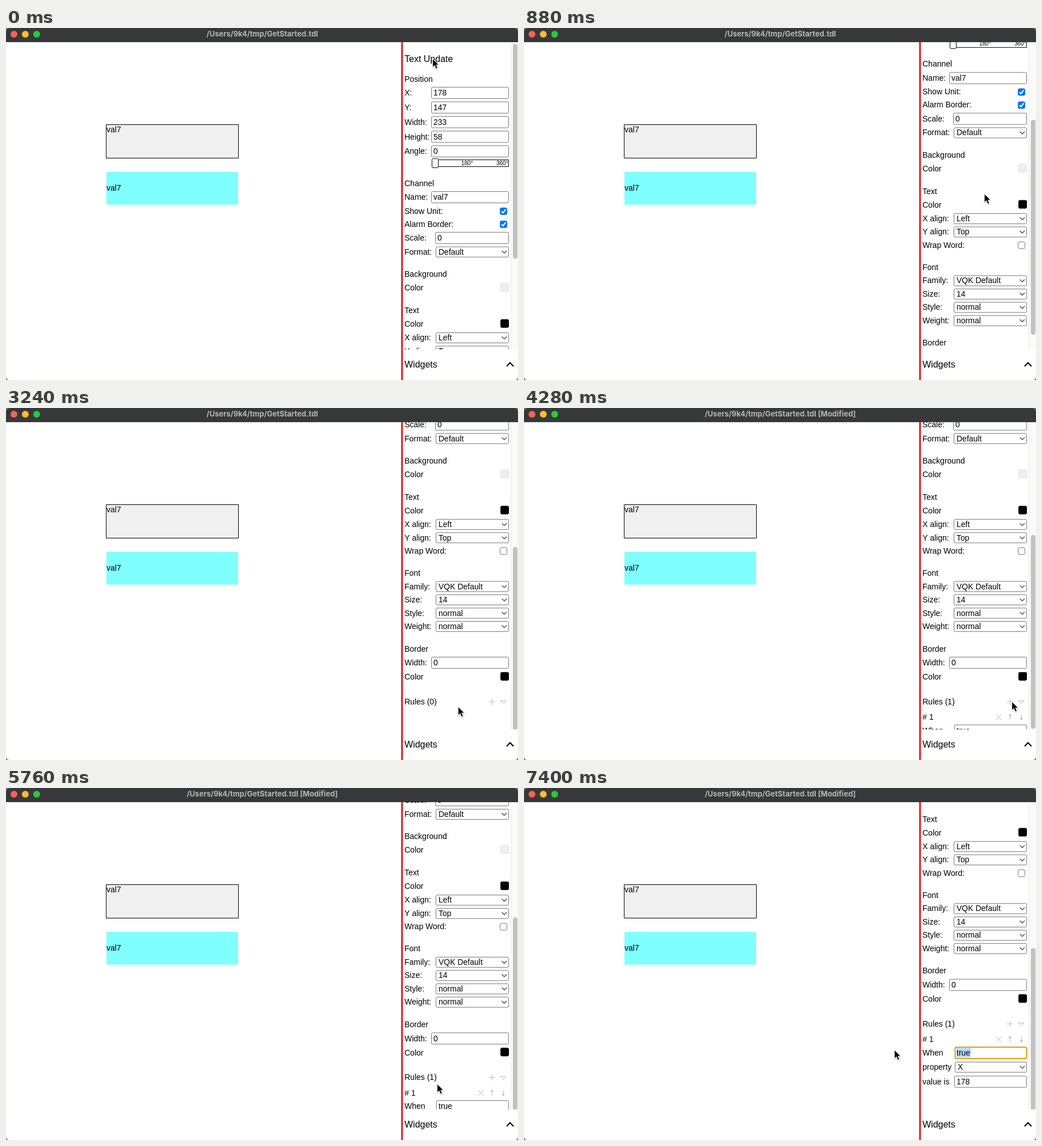
An HTML page with a canvas for the animation above (8 s loop, 902 px wide and 621 px high).

```html
<!DOCTYPE html>
<html lang="en">
<head>
<meta charset="utf-8">
<title>Rule editor</title>
<style>
html, body { margin: 0; width: 100%; height: 100%; overflow: hidden; background: #fff; }
canvas { display: block; }
</style>
</head>
<body>
<canvas id="stage" width="902" height="621"></canvas>
<script>
const ctx = document.getElementById('stage').getContext('2d');
const LOOP = 8000, TICK = 148;
const VIEW_TOP = 25, VIEW_BOTTOM = 567, VIEW_HEIGHT = 595;
const LEFT = 702, RIGHT = 886;
const CLICK_ADD = 29, CLICK_WHEN = 46;
const BORDER = '#767676', ICON = '#b8b8b8';

// Pointer stops: tick, x, y.
const stops = [[0, 752, 55], [4, 797, 211], [8, 826, 376], [10, 837, 521], [16, 705, 520],
  [18, 750, 521], [20, 701, 522], [21, 701, 522], [22, 797, 528], [27, 860, 519], [29, 860, 519],
  [34, 752, 525], [39, 760, 523], [45, 812, 468], [46, 812, 468], [50, 653, 463]];

const rowHeight = { label: 23.5, select: 23.5, input: 25.8, scale: 25.8, check: 23, color: 24.5, slider: 15.6 };
const SECTION_GAP = 16;
const rows = [
  ['label', 'Position'],
  ['input', 'X:', '178'],
  ['input', 'Y:', '147'],
  ['input', 'Width:', '233'],
  ['input', 'Height:', '58'],
  ['input', 'Angle:', '0'],
  ['slider', ''],
  ['label', 'Channel'],
  ['input', 'Name:', 'val7'],
  ['check', 'Show Unit:', true],
  ['check', 'Alarm Border:', true],
  ['scale', 'Scale:', '0'],
  ['select', 'Format:', 'Default'],
  ['label', 'Background'],
  ['color', 'Color', '#efefef', '#dedede'],
  ['label', 'Text'],
  ['color', 'Color', '#000', '#000'],
  ['select', 'X align:', 'Left'],
  ['select', 'Y align:', 'Top'],
  ['check', 'Wrap Word:', false],
  ['label', 'Font'],
  ['select', 'Family:', 'VQK Default'],
  ['select', 'Size:', '14'],
  ['select', 'Style:', 'normal'],
  ['select', 'Weight:', 'normal'],
  ['label', 'Border'],
  ['input', 'Width:', '0'],
  ['color', 'Color', '#000', '#000'],
];

const pointer = { x: 0, y: 0, overInput: false };

function ease(from, to, k) {
  const u = Math.min(1, Math.max(0, (k - from) / (to - from)));
  return u * u * (3 - 2 * u);
}

const scrollAt = k => 341.2 * ease(3.26, 8, k) + 102.1 * ease(38.2, 43, k);

function movePointer(k) {
  const next = stops.findIndex(stop => stop[0] > k);
  const [k1, x1, y1] = stops.at(next < 0 ? -1 : next);
  const [k0, x0, y0] = next < 0 ? stops[0] : stops[next - 1];
  const f = next < 0 ? 1 : (k - k0) / (k1 - k0);
  pointer.x = x0 + (x1 - x0) * f;
  pointer.y = y0 + (y1 - y0) * f;
  pointer.overInput = false;
}

function text(str, x, y, size = 14) {
  ctx.font = `${size}px "Liberation Sans", Arial, sans-serif`;
  ctx.fillStyle = '#000';
  ctx.fillText(str, x, y + size * .35);
}

function rect(x, y, w, h, color) {
  ctx.fillStyle = color;
  ctx.fillRect(x, y, w, h);
}

function box(x, y, w, h, r, fill, stroke, line = 1) {
  ctx.beginPath();
  ctx.roundRect(x, y, w, h, r);
  ctx.fillStyle = fill;
  ctx.fill();
  if (!stroke) return;
  ctx.strokeStyle = stroke;
  ctx.lineWidth = line;
  ctx.stroke();
}

// Each path is drawn around the point (x, y).
function lines(x, y, color, width, ...paths) {
  ctx.beginPath();
  for (const p of paths) {
    for (let i = 0; i < p.length; i += 2) ctx[i ? 'lineTo' : 'moveTo'](x + p[i], y + p[i + 1]);
  }
  ctx.strokeStyle = color;
  ctx.lineWidth = width;
  ctx.stroke();
}

function triangle(x, y, w, h, color) {
  ctx.beginPath();
  ctx.moveTo(x - w / 2, y);
  ctx.lineTo(x + w / 2, y);
  ctx.lineTo(x, y + h);
  ctx.closePath();
  ctx.fillStyle = color;
  ctx.fill();
}

// Hovering lags one tick behind the scroll, as the page repaints late.
function input(x, y, value, lag = 0, focused = false) {
  const over = pointer.x > x && pointer.x < RIGHT && Math.abs(pointer.y - y - lag) < 10.5;
  if (focused) {
    box(x + 1.5, y - 9.5, RIGHT - x - 2, 20, 2.5, '#fff', '#e59700', 2);
    rect(x + 4, y - 8, 25, 16, '#b3d7ff');
  } else {
    box(x + .5, y - 9.8, RIGHT - x - 1, 20, 2, '#fff', BORDER);
  }
  text(value, x + 4, y);
  if (!over) return;
  pointer.overInput = true;
  if (isNaN(value)) return;
  rect(868, y - 9, 13, 19, '#efefef');
  triangle(874.5, y - 2, 7, -4, '#555');
  triangle(874.5, y + 3, 7, 4, '#555');
}

function select(x, y, value) {
  box(x + .5, y - 8.7, RIGHT - x - 1, 18, 2, '#fff', BORDER);
  text(value, x + 5, y);
  lines(877.8, y, '#333', 1.2, [-4.2, -1.8, 0, 2.4, 4.2, -1.8]);
}

const drawControl = {
  label() {},
  input(y, lag, value) { input(749, y, value, lag); },
  scale(y, lag, value) { input(756, y, value, lag); },
  select(y, lag, value) { select(757, y, value); },
  check(y, lag, on) {
    const color = on ? '#0075ff' : '#fff';
    box(870.5, y - 5.5, 12, 12, 2.5, color, on ? color : BORDER);
    if (on) lines(876.5, y, '#fff', 2, [-3.5, .5, -.8, 3.4, 3.8, -3]);
  },
  color(y, lag, fill, stroke) { box(871.5, y - 8, 14, 14, 2, fill, stroke); },
  slider(y) {
    box(755.5, y - 5.6, 130, 12, 0, '#fff', '#000');
    box(750.5, y - 7.6, 11, 16, 2, '#fff', '#000');
    text('180°', 802, y, 10);
    text('360°', 864, y, 10);
  },
};

function drawRows(top, scroll, lag) {
  text('Text Update', LEFT, top - 35.5, 16);
  let edge = top - rowHeight.label / 2 - SECTION_GAP;
  for (const [kind, label, ...values] of rows) {
    if (kind === 'label') edge += SECTION_GAP;
    const y = edge + rowHeight[kind] / 2;
    text(label, LEFT, y);
    drawControl[kind](y, lag, ...values);
    edge += rowHeight[kind];
  }
  return edge + SECTION_GAP + rowHeight.input / 2 + 2.5;
}

function drawRules(y, lag, added, focused) {
  text(`Rules (${added ? 1 : 0})`, LEFT, y);
  lines(856.3, y, ICON, 1, [-5.5, .2, 5.5, .2], [0, -5.3, 0, 5.7]);
  lines(876, y, ICON, 1, [-5, -1.5, 5, -1.5, 0, 3.5, -5, -1.5]);
  if (!added) return;

  const head = y + 27.3, when = y + 50.8;
  text('# 1', LEFT, head);
  lines(836.5, head + .2, ICON, 1, [-4.7, -4.7, 4.7, 4.7], [4.7, -4.7, -4.7, 4.7]);
  for (const [x, dir] of [[856.3, -1], [876.3, 1]]) {
    lines(x, head, ICON, 1, [0, -5, 0, 5]);
    triangle(x, head + 2 * dir, 5, 4 * dir, ICON);
  }
  text('When', LEFT, when);
  input(758, when, 'true', lag, focused);
  text('property', LEFT, when + 25.4);
  select(759, when + 25.4, 'X');
  text('value is', LEFT, when + 51.2);
  input(758, when + 51.2, '178', lag);
}

function drawArrow(x, y) {
  const outline = [0, 0, 0, 13.2, 3.2, 10.4, 5.8, 16.2, 7.9, 15.2, 5.3, 9.7, 9.6, 9.6, 0, 0];
  ctx.save();
  ctx.shadowColor = 'rgba(0,0,0,.35)';
  ctx.shadowBlur = 2;
  ctx.shadowOffsetY = 1;
  lines(x, y, '#fff', 2, outline);
  ctx.shadowColor = 'transparent';
  ctx.fillStyle = '#000';
  ctx.fill();
  ctx.restore();
}

function drawBeam(x, y) {
  const shape = [[0, -6, 0, 6], [-3, -7.5, 0, -6, 3, -7.5], [-3, 7.5, 0, 6, 3, 7.5], [-2, 2.5, 2, 2.5]];
  lines(x, y, '#fff', 2.6, ...shape);
  lines(x, y, '#000', 1.1, ...shape);
}

function drawWindow(modified) {
  rect(0, 0, 902, 621, '#777');
  box(0, 0, 902, 621, 6, '#fff');
  box(0, 0, 902, 25, [6, 6, 0, 0], '#373839');
  ['#fe5f57', '#febc2e', '#28c840'].forEach((color, i) => box(8 + i * 20, 5, 12, 12, 6, color));
  ctx.font = '700 13px Inter, sans-serif';
  ctx.fillStyle = '#b7b7b7';
  ctx.textAlign = 'center';
  ctx.fillText('/Users/9k4/tmp/GetStarted.tdl' + (modified ? ' [Modified]' : ''), 451.5, 15);
  ctx.textAlign = 'left';

  box(176.5, 170.5, 233, 59, 0, '#f0f0f0', '#000');
  text('val7', 177, 179);
  rect(177, 254, 232, 57.6, '#80ffff');
  text('val7', 177, 282.3);

  rect(696.3, 25, 2.7, 596, '#f00');
  text('Widgets', LEFT, 593, 16);
  lines(888, 593.5, '#000', 2.2, [-6, 3.2, 0, -3, 6, 3.2]);
}

function drawPanel(k) {
  const added = k >= CLICK_ADD, scroll = scrollAt(k), lag = scroll - scrollAt(k - 1);
  ctx.save();
  ctx.beginPath();
  ctx.rect(699, VIEW_TOP, 203, VIEW_BOTTOM - VIEW_TOP);
  ctx.clip();
  const rulesY = drawRows(89.6 - scroll, scroll, lag);
  drawRules(rulesY, lag, added, k >= CLICK_WHEN);

  // The thumb runs on behind the Widgets bar.
  const ratio = VIEW_HEIGHT / (added ? 1036 : 934);
  rect(889, VIEW_TOP, 13, VIEW_HEIGHT, '#fafafa');
  rect(889, VIEW_TOP, 1, VIEW_HEIGHT, '#e8e8e8');
  box(893, 28 + scroll * ratio, 8, VIEW_HEIGHT * ratio, 4, '#c1c1c1');
  ctx.restore();
}

function draw(t) {
  const k = Math.floor((t + 16) / TICK);
  movePointer(k);
  drawWindow(k >= CLICK_ADD);
  drawPanel(k);
  (pointer.overInput ? drawBeam : drawArrow)(pointer.x, pointer.y);
}

function frame() {
  draw(performance.now() % LOOP);
  requestAnimationFrame(frame);
}
frame();
</script>
</body>
</html>
```
